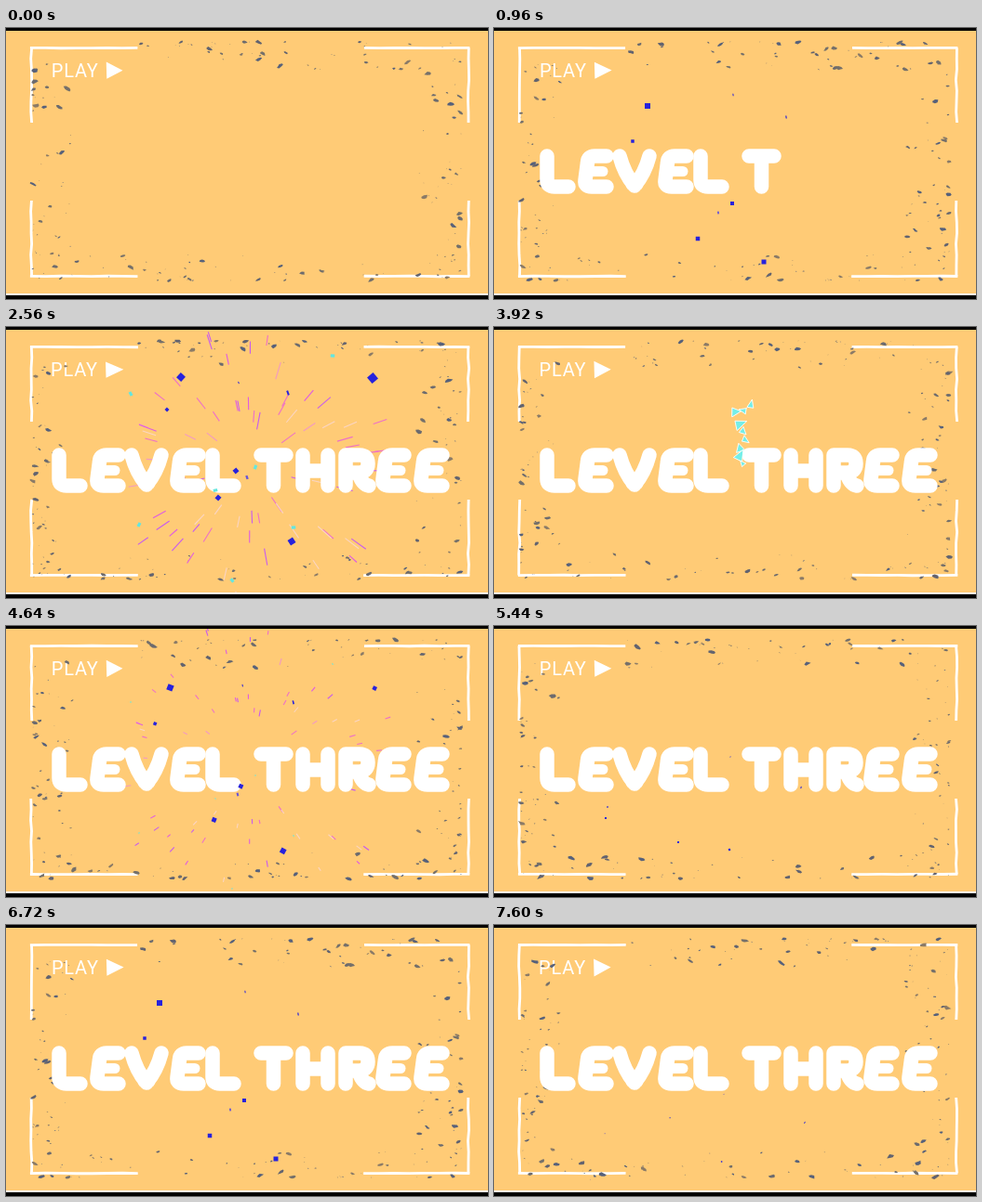
These frames come from a looping animation (518x292 px, 7.68 s). An HTML page with a canvas:

```html
<!DOCTYPE html>
<html lang="en">
<head>
<meta charset="utf-8">
<title>Level three</title>
<style>
  html, body { margin: 0; width: 100%; height: 100%; overflow: hidden; background: #ffcb76; }
  canvas { display: block; }
</style>
</head>
<body>
<canvas id="stage" width="518" height="292" role="img" aria-label="PLAY: LEVEL THREE"></canvas>
<script>
const ctx = document.getElementById('stage').getContext('2d');
const LOOP = 7680, BURST = 1920, STEP = 80;
const CENTER = [262, 150];

function seeded(seed) {
  let s = (seed * 7919 + 12345) >>> 0;
  return () => {
    s = (s + 0x6d2b79f5) >>> 0;
    let n = Math.imul(s ^ s >>> 15, s | 1);
    n ^= n + Math.imul(n ^ n >>> 7, n | 61);
    return ((n ^ n >>> 14) >>> 0) / 4294967296;
  };
}

// Rounded display letters: [thick strokes, thinner strokes]
const GLYPHS = {
  L: ['M8 8V34Q8 41 16 41H31'],
  E: ['M32 8H19Q12 8 11.5 15L9 34Q8 41 16 41H32', 'M12 24.5H28'],
  V: ['M8 8Q13 27 24 40Q35 27 40 8M22 38H26'],
  T: ['M8 8H35M21.5 8V41'],
  H: ['M9 8V41M36 8V41M9 25H36'],
  R: ['M9 41V8H24Q33 8 33 17T24 27H12M23 28Q27 40 34 41']
};
const TITLE = 'LEVEL THREE';
const LETTER_X = [49, 89, 127, 175, 214, 0, 266, 310, 356, 396, 437];
const CHAR_MS = 130;

function drawTitle(t) {
  const count = Math.min(TITLE.length, Math.floor(t / CHAR_MS));
  ctx.strokeStyle = '#fff';
  ctx.lineCap = ctx.lineJoin = 'round';
  for (let i = 0; i < count; i++) {
    const parts = GLYPHS[TITLE[i]];
    if (!parts) continue;
    ctx.save();
    ctx.translate(LETTER_X[i], 130);
    parts.forEach((d, k) => {
      ctx.lineWidth = k ? 11 : 15.5;
      ctx.stroke(new Path2D(d));
    });
    ctx.restore();
  }
}

function polygon(points, color) {
  ctx.fillStyle = color;
  ctx.beginPath();
  points.forEach(([x, y]) => ctx.lineTo(x, y));
  ctx.closePath();
  ctx.fill();
}

function wobblyLine(x1, y1, x2, y2, rnd) {
  const n = 7;
  ctx.beginPath();
  for (let i = 0; i <= n; i++) {
    const k = i / n, j = (rnd() - 0.5) * 1.3;
    const upright = x1 === x2;
    ctx.lineTo(x1 + (x2 - x1) * k + (upright ? j : 0), y1 + (y2 - y1) * k + (upright ? 0 : j * 0.4));
  }
  ctx.stroke();
}

function drawFrame(step) {
  const rnd = seeded(step + 500);
  ctx.strokeStyle = '#fff';
  ctx.lineWidth = 2.8;
  ctx.lineCap = 'butt';
  ctx.lineJoin = 'round';
  for (const [x, edge] of [[27.2, 141], [497, 384]]) {
    for (const [y, end] of [[21.5, 102], [267.5, 186]]) {
      const out = x < 100 ? -1.3 : 1.3;
      wobblyLine(x + out, y, edge + rnd(), y, rnd);
      wobblyLine(x, y, x, end, rnd);
    }
  }
  const dx = rnd();
  ctx.fillStyle = '#fff';
  ctx.font = '400 20px Roboto, sans-serif';
  ctx.letterSpacing = '0.8px';
  ctx.fillText('PLAY', 48 + dx, 53);
  const j = () => rnd() * 1.2 - 0.6;
  polygon([[107 + dx, 37 + j()], [126 + j(), 46 + j()], [107.5 + dx, 55 + j()]], '#fff');
}

const SPECK_COLORS = ['#62636f', '#6c6b6e', '#57617a', '#75706a', '#8b7b67'];

function drawSpecks(step) {
  const rnd = seeded(step + 1);
  for (let i = 0; i < 190; i++) {
    const depth = rnd() ** 2, along = rnd(), side = i % 4;
    const [x, y] = [
      [142 + along * 340, 15 + depth * 30],
      [29 + depth * 42, 38 + along * 232],
      [489 - depth * 48, 24 + along * 246],
      [34 + along * 454, 272 - depth * 28]
    ][side];
    const size = 0.5 + rnd() ** 2 * 3.8;
    const tilt = rnd() - 0.5;
    const color = SPECK_COLORS[Math.floor(rnd() * SPECK_COLORS.length)];
    const points = [];
    for (let k = 0; k < 7; k++) {
      const a = k / 7 * Math.PI * 2, r = size * (0.55 + rnd() * 0.6);
      const px = Math.cos(a) * r, py = Math.sin(a) * r * 0.55;
      points.push([x + px, y + py + px * tilt]);
    }
    polygon(points, color);
  }
}

// x, y at 640, 960 and 1600 ms, then the size at those times
const CONFETTI = [
  [188, 54, 165, 84, 120, 207, 7, 6, 2],
  [394, 55, 398, 80, 402, 140, 8.5, 0, 0],
  [307, 231, 290, 252, 275, 275, 6.5, 5, 0],
  [228, 184, 219, 227, 198, 233, 5, 4.5, 2],
  [247, 155, 256, 189, 253, 241, 5, 4, 2.2],
  [303, 71, 314, 96, 330, 174, 5, 3, 2.5],
  [173, 89, 149, 122, 122, 195, 3.5, 3.5, 1.5],
  [259, 162, 241, 199, 230, 250, 4, 3, 0],
  [250, 60, 257, 72, 254, 141, 2.5, 2.5, 1.5]
];
const SPARKS = [[351, 31], [134, 72], [143, 213], [309, 216], [243, 273], [268, 151], [225, 176]];

// Curve through values at 0, 1 and 3
function through(a, b, c, k) {
  return a * (k - 1) * (k - 3) / 3 + b * k * (3 - k) / 2 + c * k * (k - 1) / 6;
}

const easeOut = k => 1 - (1 - k) ** 3;
const mix = (a, b, k) => a + (b - a) * k;

function drawSquare(x, y, w, h, angle, color) {
  ctx.save();
  ctx.translate(x, y);
  ctx.rotate(angle);
  ctx.fillStyle = color;
  ctx.fillRect(-w / 2, -h / 2, w, h);
  ctx.restore();
}

function drawConfetti(u) {
  if (u < 160) return;
  const k = (u - 640) / 320;
  CONFETTI.forEach(([ax, ay, bx, by, cx, cy, sa, sb, sc], i) => {
    let x, y, size = sa;
    if (k < 0) {
      const e = easeOut((u - 80) / 560);
      x = mix(CENTER[0], ax, e);
      y = mix(CENTER[1], ay, e);
    } else {
      x = through(ax, bx, cx, k);
      y = through(ay, by, cy, k);
      size = k < 1 ? mix(sa, sb, k) : mix(sb, sc, (k - 1) / 2);
    }
    if (size <= 0.3) return;
    const thin = i === 5 || i === 8 ? 0.4 : i === 7 ? 0.6 : 1;
    const angle = thin < 1 ? -0.35 + k * 0.2 : (0.75 + (i % 3) * 0.12) * (1 - k);
    drawSquare(x, y, size * thin, size, angle, i === 7 ? '#6a55d8' : '#2722dc');
  });
  if (u < 900) {
    SPARKS.forEach(([ax, ay], i) => {
      const e = easeOut(Math.min(1, (u - 80) / 560));
      const size = u > 640 ? 4 * (900 - u) / 260 : 4.5;
      drawSquare(mix(CENTER[0], ax, e), mix(CENTER[1], ay, e) + Math.max(0, k) * 20,
        size, size * 0.7, i + u / 200, '#64e6df');
    });
  }
}

const STREAK_COLORS = ['#e05be2', '#c85af0', '#f39bc0', '#fbd5c4', '#ee70c8'];

function drawStreaks(u) {
  if (u < 160 || u > 880) return;
  const rnd = seeded(77);
  ctx.lineCap = 'butt';
  ctx.lineWidth = 1.1;
  const head = easeOut((u - 80) / 800);
  const tail = easeOut(Math.max(0, u - 220) / 660);
  for (let i = 0; i < 70; i++) {
    const angle = rnd() * Math.PI * 2;
    const reach = 60 + rnd() * 100;
    const late = 0.85 + rnd() * 0.15;
    const color = STREAK_COLORS[Math.floor(rnd() * STREAK_COLORS.length)];
    const length = Math.max(0, 1 - Math.max(0, u - 560) / 340) * (14 + rnd() * 12);
    const r = reach * head;
    const r0 = Math.max(reach * tail * late * 0.6, r - length);
    const c = Math.cos(angle), s = Math.sin(angle);
    ctx.strokeStyle = color;
    ctx.beginPath();
    ctx.moveTo(CENTER[0] + c * r0, CENTER[1] + s * r0);
    ctx.lineTo(CENTER[0] + c * r, CENTER[1] + s * r);
    ctx.stroke();
  }
}

// Bright splinters of the launch: centre and half size
const SHARDS = [[260, 91, 5], [268, 90, 4], [276, 84, 4], [264, 104, 5], [268, 113, 4],
  [270, 122, 4], [264, 130, 4], [264, 139, 5], [267, 147, 3]];

function drawShards(u) {
  if (u < 80 || u > 320) return;
  const rnd = seeded(31);
  const spread = 1 + (u - 80) / 240 * 0.6, scale = 1 - (u - 80) / 320;
  ctx.strokeStyle = '#fff';
  ctx.lineWidth = 0.9;
  ctx.lineJoin = 'miter';
  for (const [px, py, size] of SHARDS) {
    const x = CENTER[0] + (px - CENTER[0]) * spread * spread;
    const y = CENTER[1] + (py - CENTER[1]) * spread;
    const turn = rnd() * 6;
    const points = [0, 1.7, 4].map(a => {
      const r = size * scale * (0.9 + rnd() * 0.7);
      return [x + Math.cos(a + turn) * r, y + Math.sin(a + turn) * r];
    });
    polygon(points, '#74eee8');
    ctx.stroke();
  }
}

function draw(now) {
  const t = Math.floor(now % LOOP / STEP) * STEP;
  const u = t % BURST, step = u / STEP;
  ctx.fillStyle = '#ffcb76';
  ctx.fillRect(0, 0, 518, 292);
  drawFrame(step);
  drawSpecks(step);
  drawStreaks(u);
  drawTitle(t);
  drawShards(u);
  drawConfetti(u);
  ctx.fillStyle = '#fff';
  ctx.fillRect(0, 286, 518, 2);
  ctx.fillStyle = '#000';
  ctx.fillRect(0, 0, 518, 3);
  ctx.fillRect(0, 288, 518, 4);
}

const start = performance.now();
function tick() {
  draw(performance.now() - start);
  requestAnimationFrame(tick);
}
tick();
</script>
</body>
</html>
```
